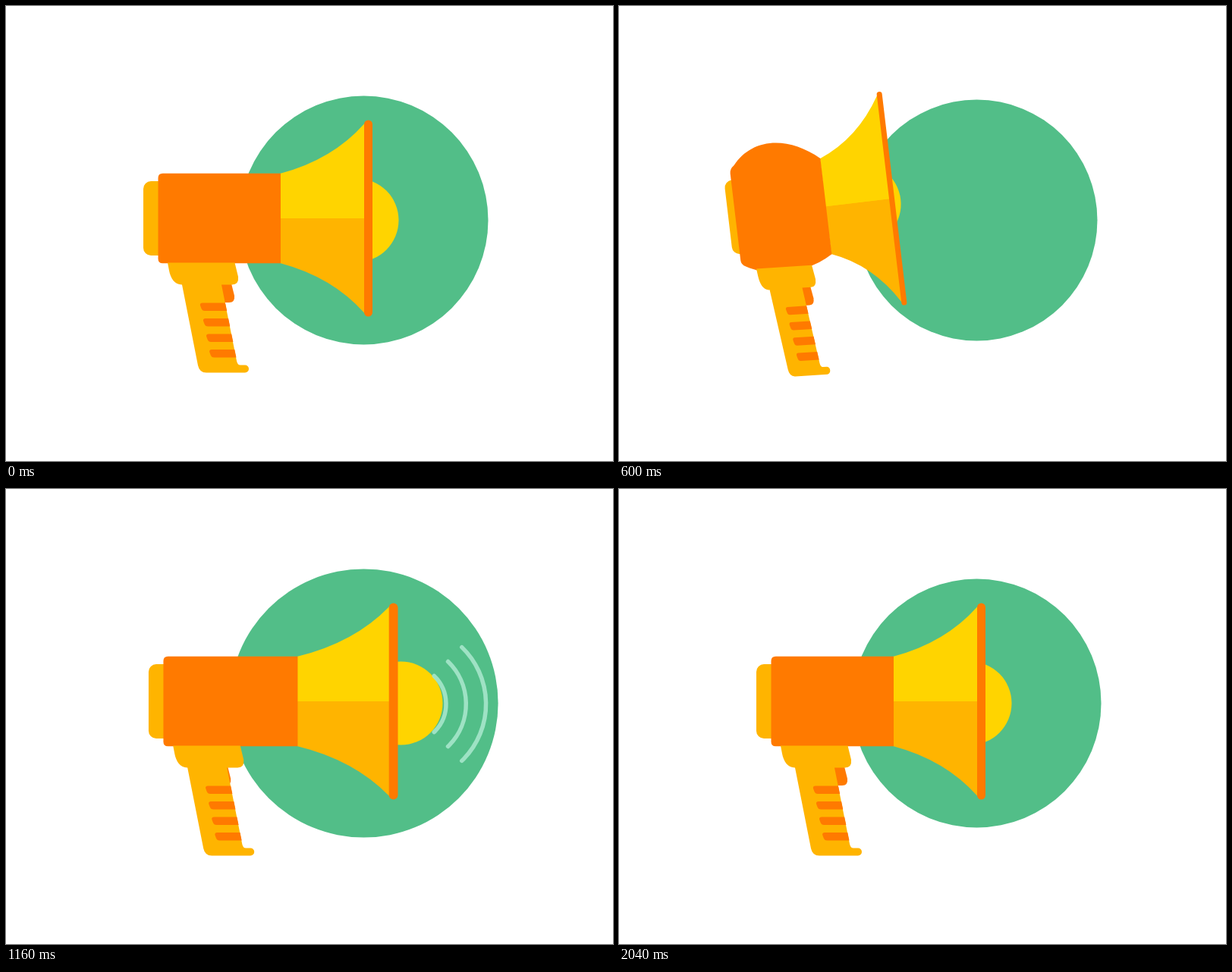
Recreate the animation shown at these times as an HTML page with a canvas. Size 800 by 600 pixels, loop 2.8 s.

```html
<!DOCTYPE html>
<html>
<head>
<meta charset="utf-8">
<title>Megaphone</title>
<style>
html, body { margin: 0; width: 800px; height: 600px; overflow: hidden; background: #fff; }
canvas { display: block; }
</style>
</head>
<body>
<canvas id="stage" width="800" height="600"></canvas>
<script>
const ctx = document.getElementById('stage').getContext('2d');
const LOOP = 2800, STEP = 40;
const GREEN = '#52be88', ORANGE = '#ff7a00', AMBER = '#ffb400', YELLOW = '#ffd400', MINT = '#a6e6cb';

const ramp = (t, from, to) => Math.min(1, Math.max(0, (t - from) / (to - from)));
const ease = (t, from, to) => {
  const u = ramp(t, from, to);
  return u * u * (3 - 2 * u);
};

// The megaphone crouches and folds back, snaps forward, drifts, then settles with a bounce.
function poseAt(t) {
  const windUp = ease(t, 0, 500);
  const snap = ease(t, 800, 1000);
  const rest = ease(t, 1440, 1640);
  const crouch = 1.12 * windUp * (1 - snap);
  const fold = 1.13 * windUp * (1 - ease(t, 600, 980));
  const drift = ramp(t, 1000, 1440);
  const settle = ramp(t, 1640, 2040);
  const loud = snap * (1 - rest);
  const stretch = loud + settle * (1 - settle) ** 2;
  const push = stretch * (0.3 + 0.7 * drift);
  const throb = 2.2 * (1 + Math.cos(2 * Math.PI * (t - 1160) / 187));

  return {
    x: 200.5 - 42 * crouch + 12.5 * push,
    y: 280 - 1.5 * crouch,
    tilt: -6 * fold,
    length: 161.5 - 36.5 * fold + 15.5 * stretch,
    cone: 110 + 28 * crouch - 51 * fold + 18.5 * push,
    half: 59.2 + 4 * crouch,
    bulge: 22 * crouch + 2 * fold,
    rimHalf: 129.5 + 20.7 * crouch - 9.7 * fold,
    rimWidth: 11 - 3.5 * fold + 1.5 * push,
    lid: 19.5 - 9 * fold,
    dome: 34.5 - 23.5 * fold + 24.5 * snap * (1 - ease(t, 1160, 1440)),
    gripX: 257 - 26.3 * crouch - 9 * fold + 13 * push,
    gripY: 339 + 6 * crouch - fold,
    gripScale: 1 - 0.2 * crouch + 0.045 * fold,
    gripTilt: 4.9 * crouch - 8.1 * fold,
    trigger: -12 * ease(t, 600, 940) * (1 - rest),
    disc: 164 - 4.5 * crouch + (17.5 - throb) * loud * loud,
    waveX: 521.9 + 18.1 * drift,
    waveAlpha: ease(t, 980, 1100) * (1 - rest) * Math.min(1, 1.14 - 0.64 * drift)
  };
}

function fill(color, path) {
  ctx.fillStyle = color;
  ctx.fill(new Path2D(path));
}

function circle(color, x, y, r) {
  ctx.fillStyle = color;
  ctx.beginPath();
  ctx.arc(x, y, r, 0, 2 * Math.PI);
  ctx.fill();
}

function roundRect(color, x, y, w, h, r) {
  ctx.fillStyle = color;
  ctx.beginPath();
  ctx.roundRect(x, y, w, h, r);
  ctx.fill();
}

function place(x, y, degrees, draw) {
  ctx.save();
  ctx.translate(x, y);
  ctx.rotate(degrees * Math.PI / 180);
  draw();
  ctx.restore();
}

function drawHorn(p) {
  const { length: L, half: h, cone, bulge: b } = p;
  const mouth = L + cone, edge = p.rimHalf - 5;
  const bend = h + 0.28 * (edge - h);

  roundRect(AMBER, -p.lid, -49, p.lid + 8, 98, [10, 0, 0, 10]);
  circle(YELLOW, mouth + p.rimWidth + p.dome - 55, 2.5, 55);

  const flare = side => `M${L - 0.5} 0V${side * h}H${L}
    Q${L + 0.62 * cone} ${side * bend} ${mouth} ${side * edge}H${mouth + 2}V0Z`;
  fill(AMBER, flare(1));
  fill(YELLOW, flare(-1));

  const top = -h - 1.35 * b, low = h + 0.8 * b;
  fill(ORANGE, `M0 ${6 - h}Q0 ${-h} 6 ${-h - 0.15 * b}
    C${0.27 * L} ${top} ${0.66 * L} ${top} ${L} ${-h}V${h}
    C${0.7 * L} ${low} ${0.32 * L} ${low} 6 ${h + 0.1 * b}Q0 ${h} 0 ${h - 6}Z`);
  roundRect(ORANGE, mouth, -p.rimHalf, p.rimWidth, 2 * p.rimHalf, p.rimWidth / 2);
}

function drawGrip(p) {
  ctx.scale(p.gripScale, 1);
  place(p.trigger, 0, 0, () => fill(ORANGE, 'M24 27H40L44 43Q45 52 37 52H24Z'));
  fill(AMBER, `M-44 -.5H44.5L49 18Q50 28.5 41 28.5H27L47 129Q48 134.5 52 134.5H58
    A5 5 0 0 1 58 144.5H7Q-2 144.5 -4 135L-25 28.5C-35 28.5 -40 20 -42 10Z`);
  for (let i = 0; i < 4; i++) {
    place(4.1 * i, 52.5 + 20.5 * i, 0, () =>
      fill(ORANGE, 'M2 0H32L34.2 10.5H5Q1.5 10.5 .3 7L-1 3.5Q-2 0 2 0Z'));
  }
}

function drawWaves(p) {
  const reach = 46 * Math.PI / 180;
  ctx.save();
  ctx.globalAlpha = p.waveAlpha;
  ctx.strokeStyle = MINT;
  ctx.lineWidth = 5.5;
  ctx.lineCap = 'round';
  for (let i = 0; i < 3; i++) {
    ctx.beginPath();
    ctx.arc(p.waveX, 283.5, 51.5 + 26.3 * i, -reach, reach);
    ctx.stroke();
  }
  ctx.restore();
}

function render() {
  const t = Math.floor(performance.now() % LOOP / STEP) * STEP;
  const p = poseAt(t);

  ctx.fillStyle = '#fff';
  ctx.fillRect(0, 0, 800, 600);
  circle(GREEN, 471.5, 282.5, p.disc);
  place(p.x, p.y, p.tilt, () => drawHorn(p));
  place(p.gripX, p.gripY, p.gripTilt, () => drawGrip(p));
  drawWaves(p);
  requestAnimationFrame(render);
}
render();
</script>
</body>
</html>
```
